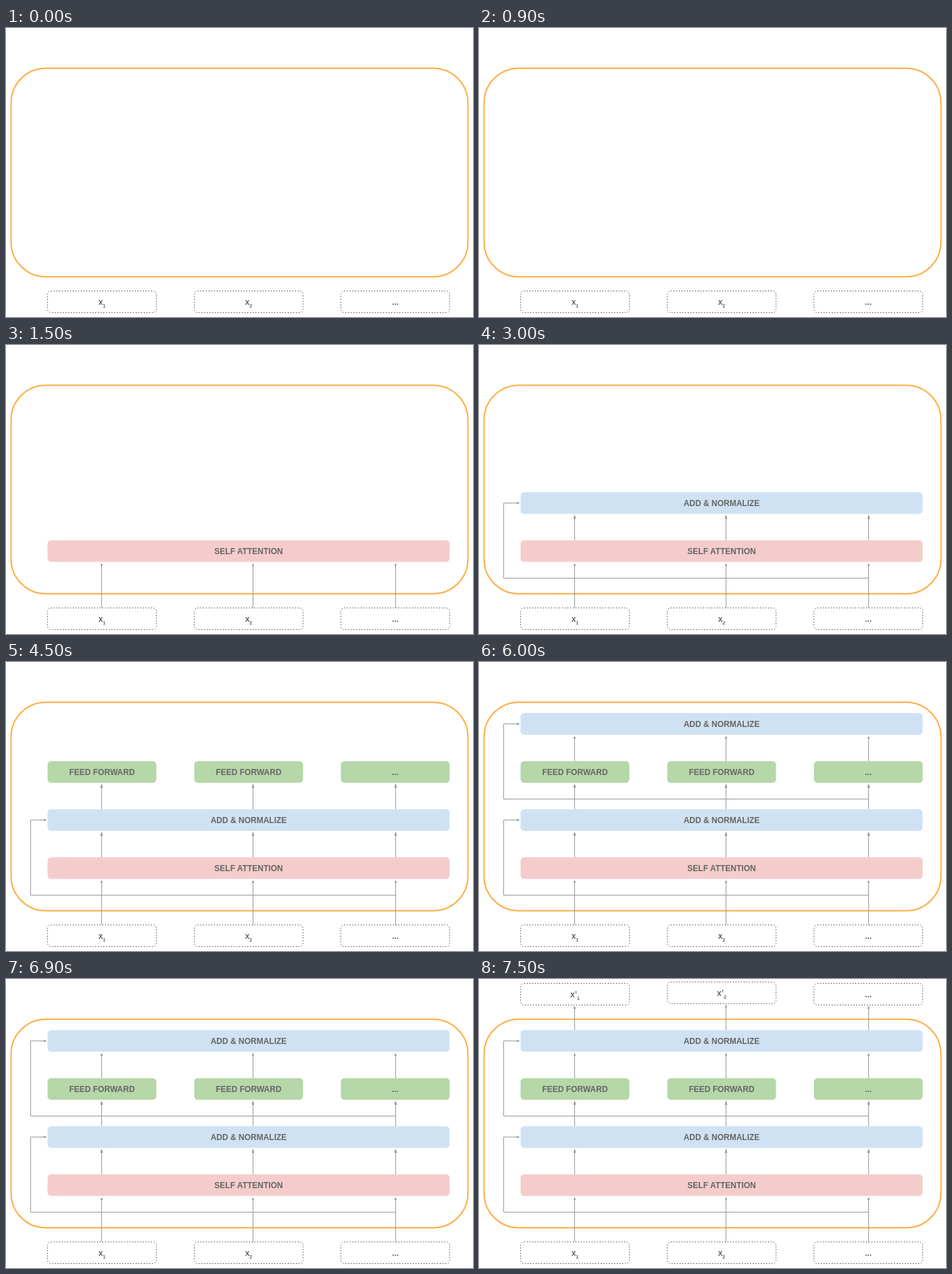
Write an HTML page that moves like this. It is 691 px wide and 427 px high and loops after 8000 ms.

```html
<!DOCTYPE html>
<html lang="en">
<head>
<meta charset="utf-8">
<title>Encoder block</title>
<style>
html, body { margin: 0; width: 100%; height: 100%; overflow: hidden; background: #fff; }
svg { display: block; }
text { font: bold 12px "Liberation Sans", Arial, sans-serif; fill: #666; text-anchor: middle; }
.sub { font-size: 7.2px; }
.block { fill: #fff; stroke: #ffab40; stroke-width: 2; }
.dotted { fill: #fff; stroke: #000; stroke-dasharray: 1 3; }
.wire { fill: none; stroke: #999; }
.head { fill: #999; stroke: #999; }
.pink { fill: #f4cccc; }
.blue { fill: #cfe2f3; }
.green { fill: #b6d7a8; }
.step { animation: 8s step-end infinite; }
#attention { animation-name: show1; }
#norm1 { animation-name: show2; }
#feed { animation-name: show3; }
#norm2 { animation-name: show4; }
#output { animation-name: show5; }
@keyframes show1 { 0% { opacity: 0 } 18.75%, 100% { opacity: 1 } }
@keyframes show2 { 0% { opacity: 0 } 37.5%, 100% { opacity: 1 } }
@keyframes show3 { 0% { opacity: 0 } 56.25%, 100% { opacity: 1 } }
@keyframes show4 { 0% { opacity: 0 } 75%, 100% { opacity: 1 } }
@keyframes show5 { 0% { opacity: 0 } 93.75%, 100% { opacity: 1 } }
</style>
</head>
<body>
<svg width="691" height="427" viewBox="0 0 691 427">
  <rect class="block" x="7.5" y="59.5" width="676" height="308" rx="51.3"/>
  <g id="input"></g>
  <g id="attention" class="step"></g>
  <g id="norm1" class="step"></g>
  <g id="feed" class="step"></g>
  <g id="norm2" class="step"></g>
  <g id="output" class="step"></g>
</svg>
<script>
const columns = [61.5, 278.5, 495.5];
const lanes = [141.5, 365.5, 576.5];
const small = 'l-1.12 1.12 3.09-1.12-3.09-1.12z';
const long = 'l-1.6 1.35 5.2-1.35-5.2-1.35z';

function box(kind, x, y, width, label, sub = '') {
  const subscript = sub && `<tspan class="sub" dy="4.2">${sub}</tspan>`;
  return `<rect class="${kind}" x="${x}" y="${y}" width="${width}" height="32" rx="5.3"/>
    <text x="${x + width / 2}" y="${y + 20.5}">${label}${subscript}</text>`;
}

const bar = (kind, y, label) => box(kind, 61.5, y, 595, label);

const head = (x, y, angle, shape) =>
  `<path class="head" transform="translate(${x} ${y}) rotate(${angle})" d="M0 0${shape}"/>`;

function arrow(x, from, tip, shape = small) {
  const base = tip + (shape === long ? 5.1 : 3.5);
  return `<path class="wire" d="M${x} ${from}V${base}"/>` + head(x, base, -90, shape);
}

const arrows = (from, tip, shape) =>
  lanes.map(x => arrow(x, from, tip, shape)).join('');

const skip = (from, to) =>
  `<path class="wire" d="M576.5 ${from}H36.5V${to}H57.5"/>` + head(57.5, to, 0, small);

const fill = (id, ...parts) => {
  document.getElementById(id).innerHTML = parts.join('');
};

const cells = (kind, tops, labels, subs = []) =>
  columns.map((x, i) => box(kind, x, tops[i], i < 2 ? 161 : 161, labels[i], subs[i])).join('');

const level = y => [y, y, y];

fill('input', cells('dotted', level(388.5), ['x', 'x', '...'], [1, 2]));
fill('attention', bar('pink', 288.5, 'SELF ATTENTION'), arrows(388.5, 321.5));
fill('norm1', bar('blue', 217.5, 'ADD &amp; NORMALIZE'), arrows(288.5, 250, long), skip(344.5, 233.5));
fill('feed', cells('green', level(146.5), ['FEED FORWARD', 'FEED FORWARD', '...']), arrows(217.5, 179, long));
fill('norm2', bar('blue', 75.5, 'ADD &amp; NORMALIZE'), arrows(146.5, 108.5), skip(202.5, 91.5));
fill('output', cells('dotted', [6.5, 4.5, 6.5], ['x’', 'x’', '...'], [1, 2]),
  lanes.map((x, i) => arrow(x, 75.5, i === 1 ? 37 : 39)).join(''));
</script>
</body>
</html>
```
